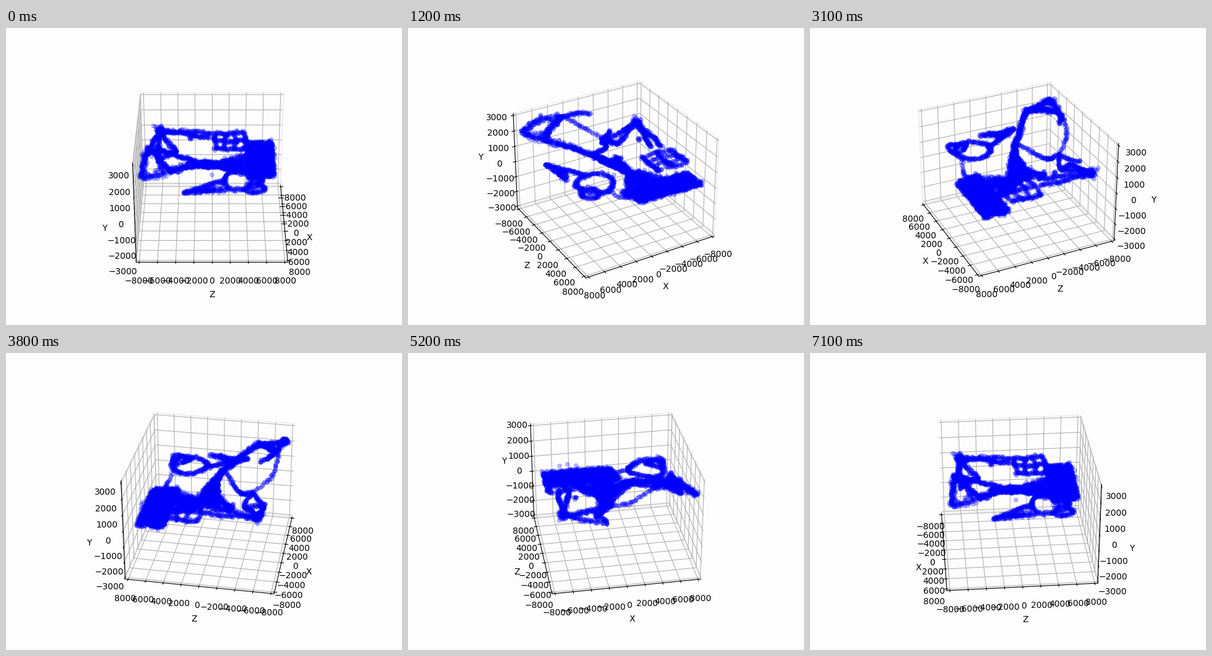
These frames come from a looping animation (640x480 px, 7200 ms). A matplotlib script:

```python
import numpy as np
import matplotlib.pyplot as plt
from matplotlib.animation import FuncAnimation

FRAMES = 72
INTERVAL = 100
UNIT = np.array([70, 70, 35])  # one cloud unit along X, Z and Y
MARGIN = 25 / 24  # room between the outermost ticks and the box

rng = np.random.default_rng(7)
cloud = []


def node(*xyz):
    return np.array(xyz, float)


def add(points, spread=1.2):
    cloud.append(points + rng.normal(0, spread, points.shape))


def strand(a, b, bow=0, passes=1, spread=1.2, step=1.8):
    """Beads from a to b, bent sideways by bow and drifting a little."""
    n = max(2, int(np.linalg.norm(b - a) / step))
    t = np.linspace(0, 1, n)[:, None]
    for _ in range(passes):
        drift = 1.5 * np.sin(n * step * t / 9 + rng.uniform(0, 6.3, 3))
        add(a + (b - a) * t + np.asarray(bow) * np.sin(np.pi * t) + drift,
            spread)


def ring(center, radius, passes=2):
    t = np.linspace(0, 2 * np.pi, int(3.5 * radius))
    for _ in range(passes):
        wavy = radius + 2 * np.sin(3 * t + rng.uniform(0, 6.3))
        add(center + np.column_stack([wavy * np.cos(t), wavy * np.sin(t),
                                      2 * np.sin(2 * t)]))


def web(a, b, c, chords):
    """Random links between the sides a-b and a-c."""
    for s, t in rng.uniform(0.2, 1, (chords, 2)):
        strand(a + (b - a) * s, a + (c - a) * t)


def slab():
    """Flat dense block with a few beads standing up along its far edge."""
    s, t = rng.uniform(0, 1, (2, 1800))
    p = -104 + s * (126 - 11 * t)
    add(np.column_stack([p, 58 + 43 * t, np.full_like(p, 4)]), (1, 1, 2))
    for p in np.linspace(-104, -30, 6):
        strand(node(p, 101, 5), node(p, 101, rng.uniform(10, 19)), step=5)


def trunk(top, left, right):
    """Sheet from a joint down to a line, then a fan towards the slab."""
    s, w = rng.uniform(0, 1, (2, 850, 1))
    s, w = s ** 0.7, w * s ** 0.7
    add(top + (left + (right - left) * w - top) * s, 2)
    t = rng.uniform(0, 1, 380)
    p = left[0] + (12 + 27 * t) * rng.uniform(-1, 1, 380)
    add(np.column_stack([p, 15 + 45 * t, np.full_like(p, 4)]), 1.6)
    add(np.tile(right, (60, 1)), 2.5)


slab()
joint = node(33, -15, 40)
trunk(joint, node(-26, 32, 2), node(-26, -35, 4))

# tall arm with its ragged loop
bend, tip = node(93, -63, 61), node(110, -105, 57)
crest, end = node(46, -97, 74), node(-1, -78, 75)
strand(joint, bend, passes=4, spread=1.8)
strand(bend, crest, passes=3, spread=1.6)
strand(bend, tip, passes=2, spread=2)
strand(tip, crest, bow=(8, -3, 7), passes=3, spread=2.4)
strand(crest, end, bow=(0, -3, 3), passes=2)
web(bend, tip, crest, 2)

# thin strand returning to the trunk
turn, spur = node(-18, -68, 29), node(-45, -93, 26)
strand(crest, turn, bow=(0, -16, 1), spread=1)
strand(joint, turn, bow=(-16, -2, -8), passes=2)
strand(turn, spur, passes=2)

# far corner with two long legs
peak, leg = node(-95, -88, 31), node(-91, 0, 28)
mid, hook = node(-42, -59, 19), node(-28, -88, 11)
for shift in (node(0, 0, 0), node(19, -4, 2)):
    strand(peak, leg + shift, passes=2)
for a, b in ((peak, mid), (peak, hook), (mid, turn), (mid, hook)):
    strand(a, b, passes=2)
add(np.tile(peak, (45, 1)), 4)
add(np.tile(node(-67, -36, 31), (7, 1)))

# flat frame with crossing strands
for q in np.linspace(5, 55, 4):
    strand(node(-104, q, 21), node(-50, q, 21))
for p in np.linspace(-104, -50, 3):
    strand(node(p, 5, 21), node(p, 55, 21), passes=2)

# near side: tangled foot, then open rings
foot, side, near = node(100, -43, 26), node(96, 20, 29), node(60, 21, 26)
strand(foot, side, passes=2)
strand(foot, near, passes=2)
web(foot, side, near, 4)
ring(node(62, 48, 26), 29)
ring(node(82, 68, 24), 14)
strand(node(50, 75, 22), node(22, 80, 4), bow=(-4, 0, -3))

cloud.append(np.zeros((1, 3)))
x, z, y = (np.vstack(cloud) * UNIT).T

fig = plt.figure(figsize=(6.4, 4.8), dpi=100, facecolor="#fdfdfd")
ax = fig.add_subplot(111, projection="3d", facecolor="#fdfdfd")
ax.scatter(x, z, y, c="b", s=20, alpha=0.25)
wide, tall = 8000 * MARGIN, 3000 * MARGIN
ax.set(xlim=(-wide, wide), ylim=(-wide, wide), zlim=(-tall, tall),
       xlabel="X", ylabel="Z", zlabel="Y")
for axis in (ax.xaxis, ax.yaxis, ax.zaxis):
    axis.pane.set(fill=False, edgecolor="#ebebeb", alpha=1)


def update(i):
    ax.view_init(elev=30, azim=i * 360 / FRAMES)
    return []


anim = FuncAnimation(fig, update, frames=FRAMES, interval=INTERVAL,
                     repeat=True, blit=False)
plt.show()
```
